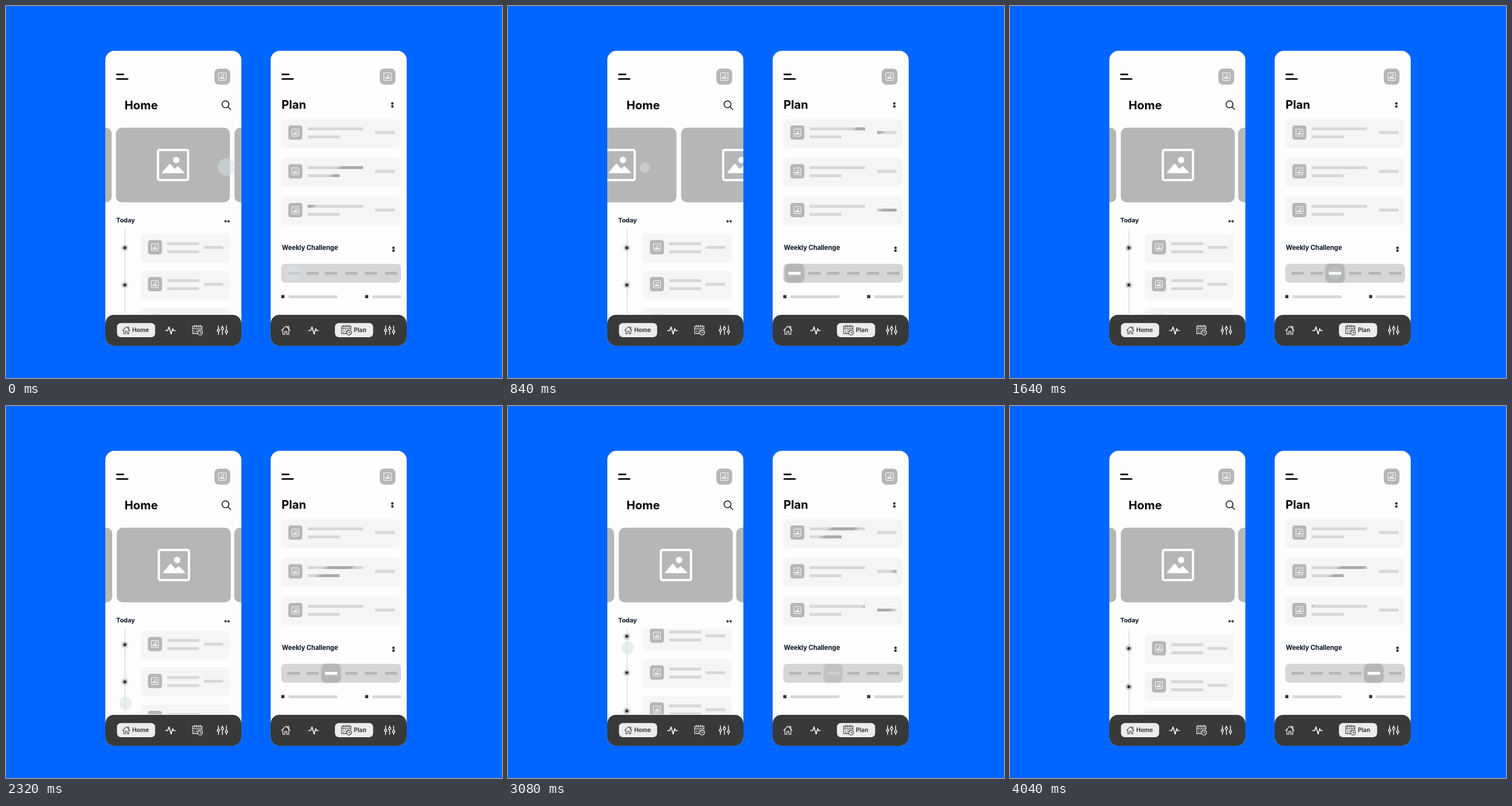
Write an HTML page with a canvas that moves like this. It is 864 by 648 pixels and loops after 4080 ms.

```html
<!DOCTYPE html>
<html lang="en">
<head>
<meta charset="utf-8">
<title>Wireframe screens</title>
<style>
html, body { margin: 0; width: 100%; height: 100%; overflow: hidden; background: #0066ff; }
canvas { display: block; width: 864px; height: 648px; }
</style>
</head>
<body>
<canvas id="stage" width="864" height="648"></canvas>
<script>
const ctx = document.getElementById('stage').getContext('2d');
const LOOP = 4080, STEP = 40;
const PAPER = '#fdfdfd', CARD = '#f5f5f5', GRAY = '#b6b6b6', LINE = '#d7d7d7', DARK = '#393939', PILL = '#ecedeb';

const clamp = v => Math.max(0, Math.min(1, v));
const ramp = (t, from, to) => clamp((t - from) / (to - from));
const smooth = u => u * u * (3 - 2 * u);
const mix = (a, b, u) => a + (b - a) * u;

// Cubic timing curve with control points (x1, 0) and (x2, 1)
function bezierEase(u, x1, x2) {
  let lo = 0, hi = 1;
  for (let i = 0; i < 24; i++) {
    const p = (lo + hi) / 2, q = 1 - p;
    if (3 * x1 * p * q * q + 3 * x2 * p * p * q + p * p * p < u) lo = p; else hi = p;
  }
  return smooth(lo);
}

function rect(x, y, w, h, color) {
  ctx.fillStyle = color;
  ctx.fillRect(x, y, w, h);
}

function box(x, y, w, h, r, color) {
  ctx.fillStyle = color;
  ctx.beginPath();
  ctx.roundRect(x, y, w, h, r);
  ctx.fill();
}

function dot(x, y, r, color) {
  ctx.fillStyle = color;
  ctx.beginPath();
  ctx.arc(x, y, r, 0, 7);
  ctx.fill();
}

function stroke(path, x, y, color, width, scale = 1) {
  ctx.save();
  ctx.translate(x, y);
  ctx.scale(scale, scale);
  ctx.strokeStyle = color;
  ctx.lineWidth = width / scale;
  ctx.lineCap = ctx.lineJoin = 'round';
  ctx.stroke(new Path2D(path));
  ctx.restore();
}

function text(str, x, y, size, color) {
  ctx.font = `700 ${size}px Inter, sans-serif`;
  ctx.fillStyle = color;
  ctx.fillText(str, x, y);
}

function clipped(x, y, w, h, r, draw) {
  ctx.save();
  ctx.beginPath();
  ctx.roundRect(x, y, w, h, r);
  ctx.clip();
  draw();
  ctx.restore();
}

// Picture placeholder; size is the outer width of its frame
function picture(cx, cy, size, frame) {
  ctx.save();
  ctx.translate(cx, cy);
  const inner = size - frame;
  ctx.strokeStyle = ctx.fillStyle = PAPER;
  ctx.lineWidth = frame;
  ctx.beginPath();
  ctx.roundRect(-inner / 2, -inner / 2, inner, inner, size * 0.05);
  ctx.stroke();
  ctx.scale(size / 56, size / 56);
  dot(5.5, -8.7, 5.5, PAPER);
  ctx.fill(new Path2D('M-19 14 Q-19 13 -18 11.8 L-7 -1.5 Q-5.8 -2.8 -4.5 -1.5 L3 7 L6.5 3 Q8 1.5 9.5 3 L18.5 12 Q19.5 13 19.5 14 Z'));
  ctx.restore();
}

function tile(x, y) {
  box(x, y, 24.5, 25, 4.5, GRAY);
  picture(x + 12.3, y + 12.5, 13, 1);
}

const HOME = 'M-7.5 .5 L0 -7 L7.5 .5 M-5.2 -1 V7.3 H-1.8 V2.2 H1.8 V7.3 H5.2 V-1 M3 -4 V-6.5 H5.2 V-2';
const PULSE = 'M-8.5 1 H-5 L-2.5 -5.5 L1.2 7 L4 -2.5 L5.5 1 H8.5';
const CALENDAR = 'M1 6 H-8 V-7 H8 V-1 M-8 -3.6 H8 M-5 -8.7 V-6 M-1.7 -8.7 V-6 M1.7 -8.7 V-6 M5 -8.7 V-6';
const SLIDERS = 'M-7 -7.5 V-1.8 M-7 2.2 V7.5 M0 -7.5 V-5 M0 -1 V7.5 M7 -7.5 V.5 M7 4.5 V7.5';

function calendar(x, y, color) {
  stroke(CALENDAR, x, y, color, 1.1);
  for (let r = 0; r < 3; r++)
    for (let c = 0; c < 4 - r; c++) rect(x - 5.6 + c * 3.2, y - 1.6 + r * 3, 1.5, 1.3, color);
  stroke('M4.3 0 A4.3 4.3 0 1 1 -4.3 0 A4.3 4.3 0 1 1 4.3 0 M0 -2.3 V.4 H2', x + 4.8, y + 4, color, 1.1);
}

function sliders(x, y) {
  stroke(SLIDERS, x, y, PAPER, 1.4);
  [[-7, 0.2], [0, -3], [7, 2.5]].forEach(([dx, dy]) =>
    stroke('M2 0 A2 2 0 1 1 -2 0 A2 2 0 1 1 2 0', x + dx, y + dy, PAPER, 1.3));
}

function phone(x, content) {
  clipped(x, 78, 237, 514, 16, () => {
    rect(x, 78, 237, 514, PAPER);
    stroke('M0 0 H11.5 M0 8 H18.7', x + 20.2, 119.2, '#000', 2.7);
    box(x + 190, 109, 27.5, 28, 8, GRAY);
    picture(x + 203.8, 123, 14, 1);
    content();
    box(x, 538, 237, 70, 15, DARK);
  });
}

function carousel(t) {
  const shift = -205 * smooth(ramp(t, 400, 1316));
  [-14.5, 191.5, 398, 602.5].forEach(x => {
    box(x + shift, 212, 198.5, 130, 10, GRAY);
    picture(x + shift + 99.5, 277, 56.5, 4);
  });
}

function timeline(t) {
  const shift = -127 * bezierEase(ramp(t, 2200, LOOP), 0.15, 0.45);
  clipped(173, 388, 237, 149, 0, () => {
    rect(207, 388, 1, 149, '#cdcdcd');
    [421.3, 486, 549.3, 616, 680].forEach((y, i) => {
      dot(207, y + shift, 6, '#d0d0d0');
      dot(207, y + shift, 2.7, '#333');
      const top = 396.5 + 64.4 * i + shift;
      box(234.5, top, 155, 50.5, 7, CARD);
      tile(247.2, top + 11.2);
      rect(281, top + 15, 55.5, 5, LINE);
      rect(281, top + 29, 55.5, 5, LINE);
      rect(344.5, top + 21.5, 34, 5, LINE);
    });
  });
}

// Sweep passes per row: the time at which each enters its row
const SWEEPS = [[290, 2760], [-420, 2015, 3660], [-15, 2425, 4065]];

function shinyBar(x, y, w, originY, starts, t) {
  rect(x, y, w, 5, LINE);
  starts.forEach(start => {
    const s = (t - start) / 1000;
    if (s < -0.1 || s > 1.35) return;
    const left = 480 + 260 * s - 81 * s * s, width = 58;
    const g = ctx.createLinearGradient(left, originY, left + width / 2, originY + width / 2);
    [[0, 0], [0.2, 1], [0.8, 1], [1, 0]].forEach(([p, a]) => g.addColorStop(p, `rgba(168,168,168,${a})`));
    rect(x, y, w, 5, g);
  });
}

function planRows(t) {
  SWEEPS.forEach((starts, i) => {
    const y = 197 + 67.5 * i;
    box(479, y, 208, 50.5, 7, CARD);
    tile(491.8, y + 11);
    shinyBar(525.5, y + 14.5, 96.5, y + 17, starts, t);
    shinyBar(525.5, y + 28.5, 55.5, y + 17, starts, t);
    shinyBar(643, y + 21, 34, y + 23.5, starts, t);
  });
}

const DAYS = [501, 534, 566.3, 601.5, 635.5, 671];
const TAPS = [
  { day: 0, x: 499, at: 0, until: 1360 },
  { day: 2, x: 566.3, at: 1400, until: 3120 },
  { day: 4, x: 633.7, at: 3280, until: LOOP + 200 }
];

function week(t) {
  box(479.5, 449, 208.5, 33, 7, '#d6d6d6');
  DAYS.forEach(x => rect(x - 10.7, 463.2, 21.5, 5, GRAY));
  TAPS.forEach(({ x, at, until }) => {
    ctx.globalAlpha = ramp(t, at + 140, at + 240) * (1 - ramp(t, until - 100, until));
    if (ctx.globalAlpha > 0) {
      ctx.save();
      ctx.shadowColor = 'rgba(0,0,0,.18)';
      ctx.shadowBlur = 3;
      box(x - 16.5, 449.3, 33, 32.7, 8, GRAY);
      ctx.restore();
      rect(x - 10.7, 463.2, 21.5, 5, '#fff');
    }
    ctx.globalAlpha = 1;
  });
}

function touch(x, y, r, alpha) {
  if (alpha <= 0) return;
  ctx.globalAlpha = alpha;
  dot(x, y, r, 'rgba(214,226,228,.5)');
  ctx.strokeStyle = 'rgba(190,208,211,.45)';
  ctx.lineWidth = 0.8;
  ctx.stroke();
  ctx.globalAlpha = 1;
}

function touches(t) {
  touch(mix(384, 201, smooth(ramp(t, 60, 1160))), 280.5 + ramp(t, 0, 800),
    mix(15, 8.5, smooth(ramp(t, 0, 240))), 1 - 0.35 * ramp(t, 1000, 1160) - 0.65 * ramp(t, 1160, 1320));
  touch(208.5, mix(529, 418.5, smooth(ramp(t, 2110, 3180))),
    mix(15, 10.5, smooth(ramp(t, 1840, 2080))), ramp(t, 1800, 1920) * (1 - ramp(t, 3440, 3600)));
  TAPS.forEach(({ day, at }) =>
    touch(DAYS[day] - 1, 465, mix(15, 11, ramp(t, at, at + 160)),
      ramp(t, at - 80, at) * (1 - ramp(t, at + 160, at + 300))));
}

function homeScreen(t) {
  phone(173, () => {
    text('Home', 206.5, 180, 20.2, '#000');
    stroke('M6 0 A6 6 0 1 1 -6 0 A6 6 0 1 1 6 0 M4.4 4.4 L9 9', 382.3, 171.3, '#111', 1.5);
    carousel(t);
    text('Today', 192, 376.5, 10.9, '#071426');
    dot(382.5, 375, 2.1, '#333');
    dot(387.8, 375, 2.1, '#333');
    timeline(t);
  });
  box(193.3, 552.3, 66.5, 24.7, 7, PILL);
  stroke(HOME, 209.5, 564.7, DARK, 1, 0.85);
  text('Home', 220, 568.4, 10.1, DARK);
  stroke(PULSE, 286.5, 564.5, PAPER, 1.6);
  calendar(333.3, 564.8, PAPER);
  sliders(377, 564.7);
}

function planScreen(t) {
  phone(461, () => {
    text('Plan', 480, 179, 20.2, '#000');
    dot(673, 169.8, 2.2, '#333');
    dot(673, 175, 2.2, '#333');
    planRows(t);
    text('Weekly Challenge', 480.5, 425.3, 11.1, '#071426');
    dot(675, 421.3, 2.2, '#333');
    dot(675, 426.3, 2.2, '#333');
    week(t);
    [[479.5, 85], [625.5, 50]].forEach(([x, w]) => {
      rect(x, 503.5, 5.5, 5.5, '#333');
      rect(x + 12.7, 504, w, 5, LINE);
    });
  });
  stroke(HOME, 487.5, 564.7, PAPER, 1.2);
  stroke(PULSE, 535.5, 564.5, PAPER, 1.6);
  box(573, 552.3, 66.5, 24.7, 7, PILL);
  calendar(592.8, 564.8, DARK);
  text('Plan', 606, 568.4, 10.1, DARK);
  sliders(668.3, 564.7);
}

function frame() {
  const t = Math.floor(performance.now() % LOOP / STEP) * STEP;
  rect(0, 0, 864, 648, '#0066ff');
  homeScreen(t);
  planScreen(t);
  touches(t);
  requestAnimationFrame(frame);
}
frame();
</script>
</body>
</html>
```
